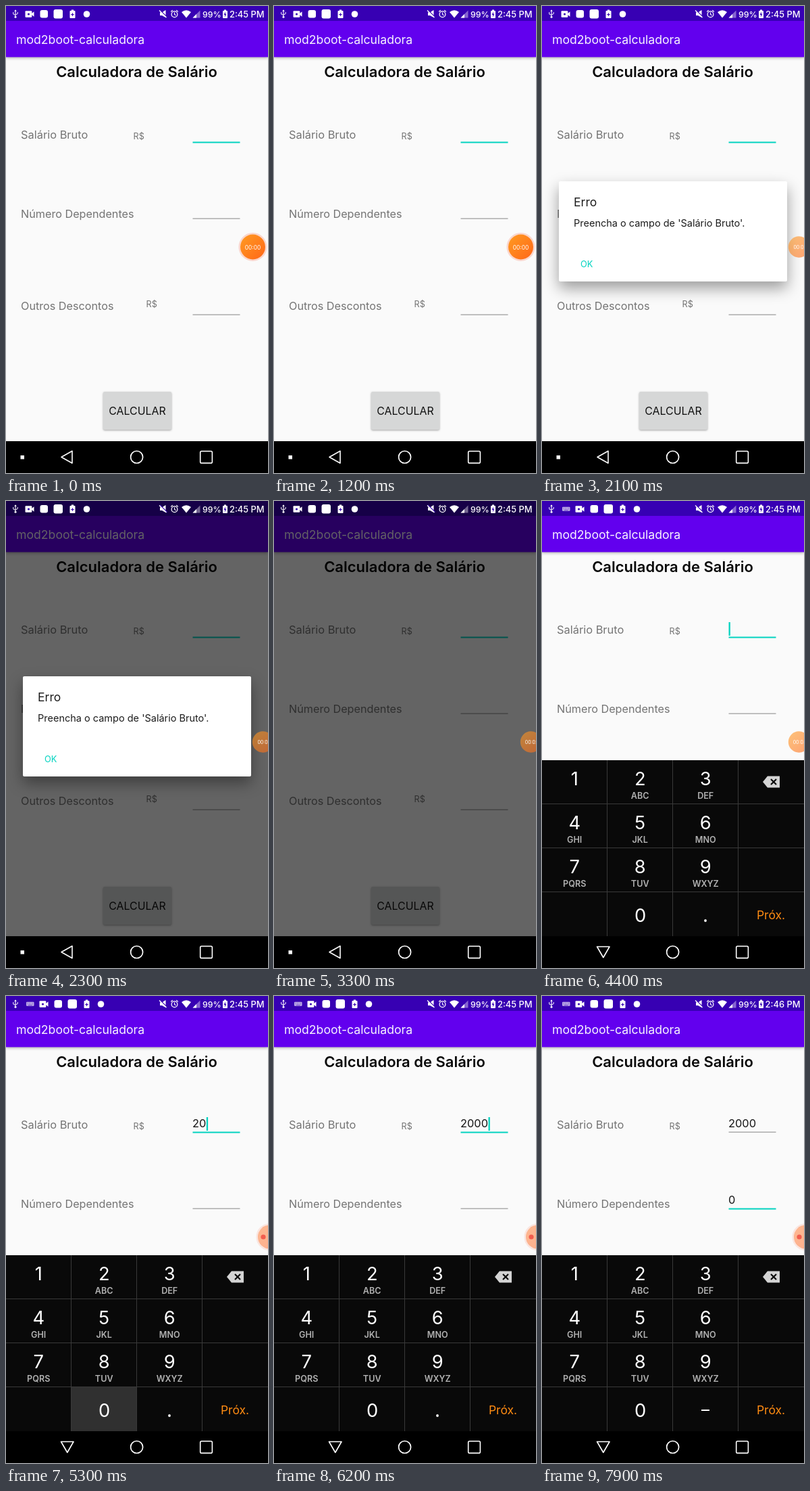
An HTML page with a canvas for the animation above (8000 ms loop, 388x690 px).

```html
<!DOCTYPE html>
<html lang="pt">
<head>
<meta charset="utf-8">
<title>Calculadora</title>
<style>
  html, body { margin: 0; width: 100%; height: 100%; overflow: hidden; background: #000; }
  canvas { display: block; width: 388px; height: 690px; }
</style>
</head>
<body>
<canvas id="stage"></canvas>
<script>
const W = 388, H = 690, LOOP = 8000, STEP = 100;
const TEAL = '#03d3c0', GRAY = '#747474';
const canvas = document.getElementById('stage');
const ctx = canvas.getContext('2d');
const dpr = window.devicePixelRatio || 1;
canvas.width = W * dpr;
canvas.height = H * dpr;

const within = (t, a, b) => t >= a && t < b;
const ramp = (t, a, b) => Math.min(1, Math.max(0, (t - a) / (b - a)));
const ease = p => 1 - (1 - p) ** 3;
const mix = (a, b, p) => a + (b - a) * p;

function rect(x, y, w, h, color) {
  ctx.fillStyle = color;
  ctx.fillRect(x, y, w, h);
}

function round(x, y, w, h, r, color) {
  ctx.beginPath();
  ctx.roundRect(x, y, w, h, r);
  ctx.fillStyle = color;
  ctx.fill();
}

function disc(x, y, r, color) {
  ctx.beginPath();
  ctx.arc(x, y, r, 0, Math.PI * 2);
  ctx.fillStyle = color;
  ctx.fill();
}

function ring(x, y, r, width, color = '#fff') {
  ctx.beginPath();
  ctx.arc(x, y, r, 0, Math.PI * 2);
  ctx.lineWidth = width;
  ctx.strokeStyle = color;
  ctx.stroke();
}

function trace(points, closed) {
  ctx.beginPath();
  points.forEach(([x, y]) => ctx.lineTo(x, y));
  if (closed) ctx.closePath();
}

function poly(points, color) {
  trace(points, true);
  ctx.fillStyle = color;
  ctx.fill();
}

function line(points, width, color = '#fff', closed = false) {
  trace(points, closed);
  ctx.lineWidth = width;
  ctx.strokeStyle = color;
  ctx.stroke();
}

// y is the middle of the capital letters
function text(str, x, y, size, color, align = 'left', weight = 400) {
  ctx.font = `${weight} ${size}px Inter, Roboto, sans-serif`;
  ctx.textAlign = align;
  ctx.fillStyle = color;
  ctx.fillText(str, x, y + size * 0.364);
}

function shadowed(blur, dy, alpha, draw) {
  ctx.save();
  ctx.shadowColor = `rgba(0,0,0,${alpha})`;
  ctx.shadowBlur = blur * dpr;
  ctx.shadowOffsetY = dy * dpr;
  draw();
  ctx.restore();
}

function field(y, focused, value, cursor) {
  if (focused) rect(276.5, y - 0.5, 70, 2, TEAL);
  else rect(276.5, y - 0.4, 70, 1, '#858585');
  text(value, 276, y - 13, 16.4, '#161616');
  if (!cursor) return;
  const x = value ? 276.5 + ctx.measureText(value).width : 276.5;
  rect(x, y - 22, 2.3, 20, TEAL);
}

function cursorOn(t) {
  return within(t, 500, 1000) || within(t, 3400, 3900) || within(t, 4000, 4500) ||
    within(t, 5000, 6600) || within(t, 6800, 7300) || within(t, 7400, 7900);
}

function drawApp(t) {
  rect(0, 0, W, H, '#fafafa');
  shadowed(4, 1, 0.3, () => rect(0, 22, W, 53.5, '#6200ee'));
  rect(0, 0, W, 22, '#3700b3');
  text('mod2boot-calculadora', 15, 50, 17.65, '#f8f4fe');
  text('Calculadora de Salário', 193.5, 96.5, 22, '#080808', 'center', 600);

  text('Salário Bruto', 22, 190, 16.4, GRAY);
  text('Número Dependentes', 22, 307, 16.2, GRAY);
  text('Outros Descontos', 22, 443, 16.2, GRAY);
  text('R$', 188.5, 192, 12.7, GRAY);
  text('R$', 207.5, 440, 12.7, GRAY);

  const typed = [5000, 5300, 5700, 6100].filter(at => t >= at).length;
  const second = t >= 6800, on = cursorOn(t);
  field(201, !second, '2000'.slice(0, typed), on && !second);
  field(314, second, t >= 7400 ? '0' : '', on && second);
  field(456, false, '', false);

  const face = within(t, 1500, 2000) ? '#cbcccc' : '#d6d7d7';
  shadowed(3, 1, 0.35, () => round(144, 570, 101, 56, 2, face));
  text('CALCULAR', 194.5, 598, 15.9, '#111', 'center');
}

function drawDialog(t) {
  const shown = ramp(t, 1800, 2100) * (1 - ramp(t, 3000, 3250));
  if (!shown) return;
  ctx.save();
  ctx.globalAlpha = shown;
  shadowed(22, 10, 0.38, () => round(25, 259, 338, 148, 2, '#fff'));
  text('Erro', 47, 290, 17.5, '#1c1c1c');
  text("Preencha o campo de 'Salário Bruto'.", 47, 320.5, 14.5, '#1c1c1c');
  text('OK', 57, 381.5, 12.8, TEAL);
  ctx.restore();
}

function drawKeyboard(t) {
  const top = Math.round(mix(643, 383, ease(ramp(t, 4000, 4300))));
  if (top >= 643) return;
  ctx.save();
  ctx.translate(0, top - 383);
  rect(0, 383, W, 260, '#090909');
  if (within(t, 4900, 5200)) rect(97, 383, 97, 65, '#303030');
  if ([5200, 5600, 6000].some(at => within(t, at, at + 200))) rect(97, 578, 97, 65, '#303030');
  for (const x of [96, 193, 290]) rect(x, 383, 1, 260, '#393939');
  for (const y of [447, 512, 577]) rect(0, y, W, 1, '#393939');

  const letters = ['', 'ABC', 'DEF', 'GHI', 'JKL', 'MNO', 'PQRS', 'TUV', 'WXYZ'];
  letters.forEach((group, i) => {
    const x = 48.2 + i % 3 * 97, y = 410.3 + Math.floor(i / 3) * 65;
    text(String(i + 1), x, y, 27.3, '#fff', 'center');
    text(group, x, y + 25, 12.6, '#b2b2b2', 'center', 600);
  });
  text('0', 145.5, 612, 27.3, '#fff', 'center');
  if (t >= 6800) rect(236, 611, 12, 2, '#fff');
  else disc(242, 620, 1.9, '#fff');
  text('Próx.', 339, 611.5, 17.5, '#ff8c12', 'center');

  poly([[327, 415], [334, 406.5], [352, 406.5], [352, 423.5], [334, 423.5]], '#d4d4d4');
  line([[339, 411], [347, 419]], 2.2, '#090909');
  line([[347, 411], [339, 419]], 2.2, '#090909');
  ctx.restore();
}

function drawNav(t) {
  const typing = t >= 4100;
  rect(0, 643, W, 47, '#000');
  ctx.lineJoin = 'round';
  if (!typing) rect(21.5, 664, 5.5, 5.5, '#fff');
  const arrow = typing ? [[81.5, 658.5], [100, 658.5], [90.8, 674.5]] : [[82, 666.5], [98, 657.5], [98, 675.5]];
  line(arrow, 1.6, '#fff', true);
  ring(193.6, 666.5, 9, 1.7);
  ctx.beginPath();
  ctx.roundRect(287.7, 657.7, 17.7, 17.7, 2);
  ctx.lineWidth = 1.6;
  ctx.stroke();
}

function drawNotices(typing) {
  // usb
  line([[14, 6], [14, 16]], 1.1);
  line([[10.8, 9], [10.8, 12], [14, 13.5]], 1);
  line([[17.2, 9], [17.2, 11.5], [14, 13]], 1);
  poly([[12.3, 8], [14, 5.3], [15.7, 8]], '#fff');
  disc(14, 16.2, 1.5, '#fff');

  ctx.save();
  if (typing) {
    ctx.globalAlpha = 0.7;
    round(30, 8.8, 11.5, 6, 1, '#fff');
    for (let i = 0; i < 8; i++) rect(31.4 + i % 4 * 2.5, 9.8 + (i >> 2) * 1.8, 1, 1, '#3700b3');
    rect(32.8, 13.3, 6, 0.8, '#3700b3');
    ctx.globalAlpha = 1;
    ctx.translate(21, 0);
  }
  // camera
  round(28.5, 7.3, 9.8, 9.4, 1, '#fff');
  poly([[38, 11], [41.5, 8.3], [41.5, 15.7], [38, 13]], '#fff');
  disc(33.5, 12, 1.6, '#3700b3');
  round(50.5, 6, 11.5, 11.5, 3, '#fff');
  round(70.5, 5, 13.5, 13.5, 3, '#fff');
  // charging
  round(94.5, 7, 8, 11, 1, '#fff');
  rect(96.8, 5.5, 3.4, 2, '#fff');
  rect(96.3, 12, 4.4, 1.2, '#3700b3');
  rect(97.9, 10.4, 1.2, 4.4, '#3700b3');
  disc(119.5, 12, 4.8, '#fff');
  ctx.restore();
}

function drawSystem(t) {
  // muted speaker
  poly([[228, 9.5], [231, 9.5], [236.5, 6], [236.5, 17], [231, 14], [228, 14]], '#fff');
  line([[228, 6], [238.5, 16.5]], 1.4, '#3700b3');
  line([[227, 6.5], [237.5, 17]], 1.2);
  // alarm
  ring(249.5, 12.3, 4.4, 1.3);
  line([[249.5, 9.5], [249.5, 12.5], [251.7, 13.7]], 1.1);
  line([[244.2, 8.5], [246.8, 6.3]], 1.2);
  line([[252.2, 6.3], [254.8, 8.5]], 1.2);
  // wifi
  ctx.beginPath();
  ctx.moveTo(267, 17.5);
  ctx.lineTo(260, 9);
  ctx.quadraticCurveTo(267, 3.5, 274, 9);
  ctx.fillStyle = '#fff';
  ctx.fill();
  // signal
  poly([[276.5, 17.5], [287.5, 17.5], [287.5, 6.5]], 'rgba(255,255,255,.4)');
  poly([[276.5, 17.5], [282, 17.5], [282, 12]], '#fff');

  text('99%', 291, 12.3, 12.3, '#fff', 'left', 500);
  round(321, 7, 7, 11, 1, '#fff');
  rect(323, 5.5, 3, 2, '#fff');
  poly([[325, 8.5], [322.5, 13], [324.2, 13], [323.8, 16.5], [326.5, 11.8], [324.8, 11.8]], '#3700b3');
  text(t >= 6600 ? '2:46 PM' : '2:45 PM', 382.5, 12.3, 12.9, '#fff', 'right', 500);
}

function drawRecorder(t) {
  const dock = ease(ramp(t, 1500, 1800));
  const parked = t >= 5200;
  const x = parked ? 390.5 : mix(365.5, 380.5, dock);
  const r = parked ? 17.5 : mix(18.5, 15.7, dock);
  const tint = ctx.createLinearGradient(x - r, 356 - r, x + r, 356 + r);
  tint.addColorStop(0, parked ? '#ff8c4a' : '#ff9c22');
  tint.addColorStop(1, parked ? '#ff7a45' : '#ff6618');
  ctx.save();
  ctx.globalAlpha = mix(1, 0.6, dock);
  if (parked || dock < 1) ring(x, 356, r + 1, 3, 'rgba(250,190,175,.6)');
  disc(x, 356, r, tint);
  if (parked) {
    ctx.globalAlpha = 0.75;
    disc(381, 356, 3.6, '#ee4038');
  } else {
    ctx.globalAlpha = 1;
    const sec = Math.max(0, Math.floor((t - 1100) / 1000));
    text('00:0' + sec, x + dock, 356.5, mix(8.3, 7, dock), '#fff', 'center');
  }
  ctx.restore();
}

function render(t) {
  ctx.setTransform(dpr, 0, 0, dpr, 0, 0);
  drawApp(t);
  const dim = 0.6 * ramp(t, 2100, 2300) * (1 - ramp(t, 3300, 3600));
  if (dim) rect(0, 0, W, H, `rgba(0,0,0,${dim})`);
  drawDialog(t);
  drawKeyboard(t);
  drawNav(t);
  drawNotices(t >= 4100);
  drawSystem(t);
  drawRecorder(t);
}

const start = performance.now();
function tick() {
  const t = (performance.now() - start) % LOOP;
  render(Math.floor(t / STEP) * STEP);
  requestAnimationFrame(tick);
}
tick();
</script>
</body>
</html>
```
